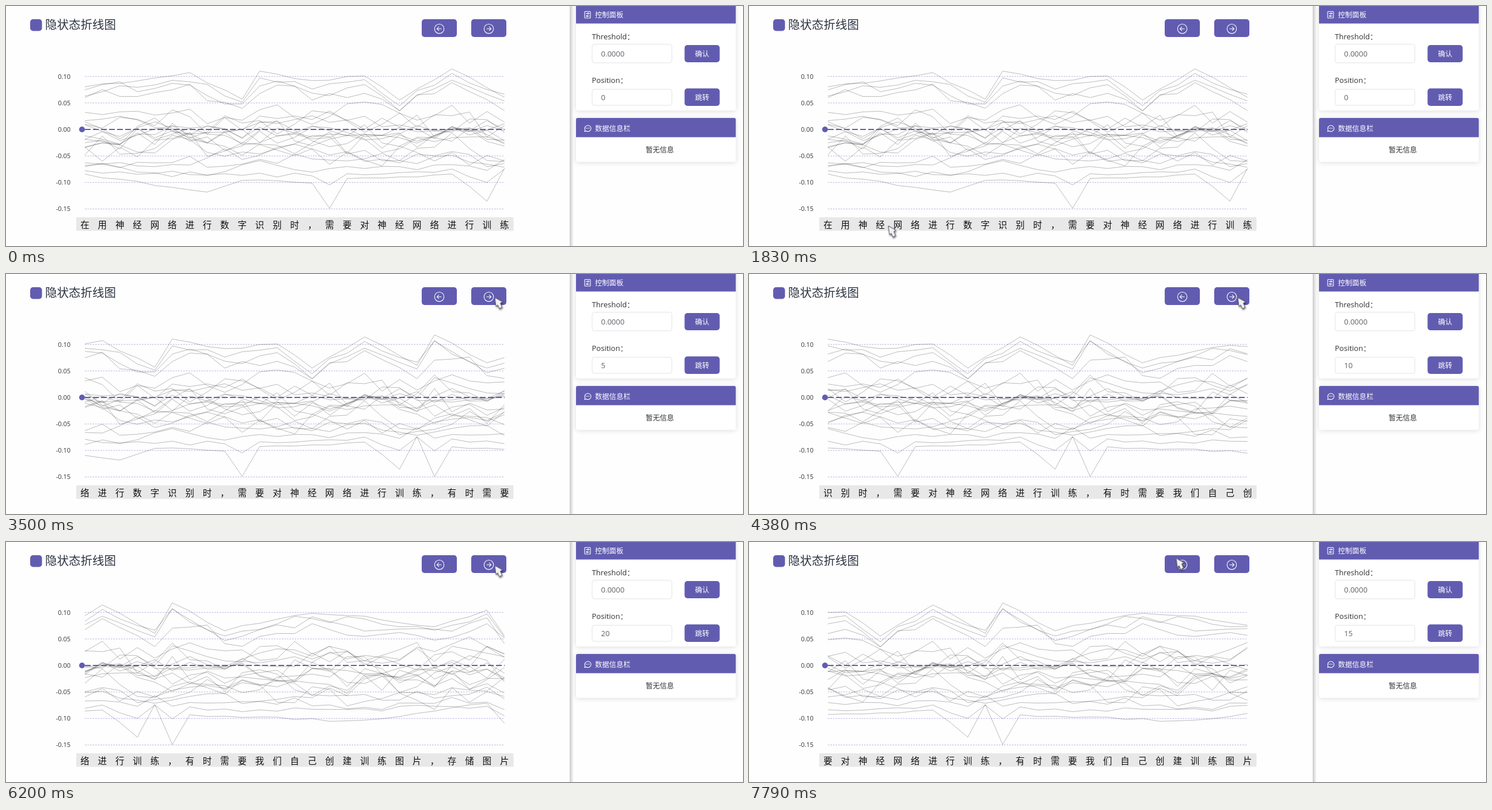
An HTML page that plays this animation: 1280 by 418 pixels, repeating every 8000 ms.

```html
<!DOCTYPE html>
<html lang="zh-CN">
<head>
<meta charset="utf-8">
<style>
  html, body { margin: 0; height: 100%; overflow: hidden; background: #fefefe; }
  svg { display: block; width: 100%; height: 100%; }
  text { font-family: "Open Sans", "Noto Sans CJK SC", sans-serif; fill: #303133; }
  .title { font: 20.5px "Noto Serif", "Noto Sans CJK SC", serif; fill: #2c3340; }
  .axis text { font-size: 11px; text-anchor: end; }
  .row text { font: 15.5px "Noto Sans CJK SC", sans-serif; fill: #111; text-anchor: middle; }
  .label { font-size: 13px; }
  .value { font-size: 13px; fill: #606266; }
  .head, .btn { font-size: 12.3px; fill: #fff; }
  .btn { font-weight: 500; text-anchor: middle; }
  .accent { fill: #625cb1; }
  .icon { fill: none; stroke: #fff; stroke-width: 1.1; }
  .field { fill: #fff; stroke: #e2e3e8; }
  .card { fill: #fff; filter: drop-shadow(0 1px 4px #0002); }
  #lines path { fill: none; stroke: #000; stroke-opacity: .27; }
  #cursor { filter: drop-shadow(1px 2px 1.5px #0008); }
</style>
</head>
<body>
<svg viewBox="0 0 1280 418" preserveAspectRatio="none">
  <defs>
    <linearGradient id="edge">
      <stop stop-color="#c9c9cc"/><stop offset="1" stop-color="#fefefe"/>
    </linearGradient>
  </defs>
  <rect x="979" width="7" height="418" fill="url(#edge)"/>

  <rect class="accent" x="42" y="23" width="20.5" height="20.5" rx="5"/>
  <text class="title" x="68" y="40">隐状态折线图</text>
  <g class="accent">
    <rect x="722" y="23" width="61" height="31" rx="5"/>
    <rect x="808" y="23" width="61" height="31" rx="5"/>
  </g>
  <g class="icon">
    <circle cx="752.5" cy="39.7" r="8.2"/>
    <path d="M756.5 39.7h-8m3.5-3.5l-3.5 3.5l3.5 3.5"/>
    <circle cx="838.5" cy="39.7" r="8.2"/>
    <path d="M834.5 39.7h8m-3.5-3.5l3.5 3.5l-3.5 3.5"/>
  </g>

  <g class="axis" id="axis"></g>
  <g id="lines"></g>
  <path d="M137 215H866" stroke="#625cb1" stroke-width="2" stroke-dasharray="10 4"/>
  <circle class="accent" cx="132" cy="215" r="5"/>
  <rect x="122" y="368" width="759.5" height="23.5" fill="#e8e8e8"/>
  <g class="row" id="row"></g>

  <rect class="card" x="990" y="-4" width="277.5" height="186" rx="4"/>
  <path class="accent" d="M990 0h277.5v30.5H990z"/>
  <g class="icon">
    <rect x="1005" y="9.5" width="10" height="11.5" rx="1"/>
    <path d="M1007 13h3m2 0h1.5M1007 17.5h1.5m2 0h3"/>
    <circle cx="1011" cy="13" r="1.2"/><circle cx="1009.5" cy="17.5" r="1.2"/>
  </g>
  <text class="head" x="1023" y="20">控制面板</text>
  <text class="label" x="1017.5" y="57.5">Threshold：</text>
  <rect class="field" x="1018" y="66.5" width="138.5" height="32.5" rx="4"/>
  <text class="value" x="1033.5" y="87.5">0.0000</text>
  <rect class="accent" x="1178.5" y="68" width="61" height="30" rx="5"/>
  <text class="btn" x="1209" y="87.7">确认</text>
  <text class="label" x="1017.5" y="134">Position：</text>
  <rect class="field" x="1018" y="145" width="138.5" height="28" rx="4"/>
  <text class="value" id="pos" x="1033.5" y="163.5"></text>
  <rect class="accent" x="1178.5" y="143.5" width="61" height="30.5" rx="5"/>
  <text class="btn" x="1209" y="163.7">跳转</text>

  <rect class="card" x="990" y="195" width="277.5" height="76.5" rx="4"/>
  <path class="accent" d="M990 228.5V198q0-3 3-3h271.5q3 0 3 3v30.5z"/>
  <g class="icon">
    <path d="M1005 218.5l.6-3a5.5 5.3 0 1 1 2 2.2z"/>
    <path d="M1007.2 212.8h1.3m1.1 0h1.3m1.1 0h1.3" stroke-width="1.4"/>
  </g>
  <text class="head" x="1023" y="217.7">数据信息栏</text>
  <text x="1135.5" y="254.7" font-size="12.3" text-anchor="middle">暂无信息</text>

  <path id="cursor" d="M0 0L13 7.5L9.5 10L12.5 16.5L8 19.5L5 13L2 15Z"
    fill="#f0eff4" stroke="#77757e" stroke-width="1.2" stroke-linejoin="round"/>
</svg>
<script>
const $ = id => document.getElementById(id);
const words = [..."在用神经网络进行数字识别时，需要对神经网络进行训练，有时需要我们自己创建训练图片，存储图片"];
const shown = 25;
const colX = i => 137 + i * 30.36;

// Linear interpolation through [at, ...values] keys
function along(keys, at) {
  const i = Math.max(1, keys.findIndex(k => k[0] >= at));
  const [a, ...from] = keys[i - 1], [b, ...to] = keys[i];
  return from.map((v, n) => v + (to[n] - v) * (at - a) / (b - a));
}

let seed = 11;
function rnd() {
  seed = (seed * 16807) % 2147483647;
  return seed / 2147483647;
}

// Shared bends of the upper and lower bands: [word, offset]
const crest = [[0, 5], [6, -20], [9, 25], [10, -25], [13, -5], [16, -17], [18, 25],
  [21, -30], [24, 17], [25, -32], [28, 15], [33, -18], [40, 12], [43, -20], [44, 22]];
const trough = [[0, -7], [7, 24], [9, 2], [13, 8], [14, 51], [15, 4], [21, -8],
  [23, 40], [24, -16], [25, 53], [26, 2], [36, 12], [43, -20], [44, 17]];

// A curve follows its band's bends around a level, with a short-memory wobble
function curve(level, bends, follow, wobble) {
  let n = 0;
  return words.map((_, i) => {
    n = n * 0.3 + (rnd() + rnd() - 1) * wobble;
    return level + follow * along(bends, i)[0] + n;
  });
}

const curves = [];
for (let k = 0; k < 4; k++) {
  curves.push(curve(138 + k * 7, crest, 1 - k * 0.1, 4 + k * 5));
  curves.push(curve(300 - k * 10, trough, 1 / (1 + k * 2), 4 + k * 5));
}
const inner = 14;
for (let k = 0; k < inner; k++) {
  const s = 2 * k / (inner - 1) - 1;
  curves.push(curve(227 + 36 * s * Math.sqrt(Math.abs(s)), crest, 0.15, 30));
}

$("axis").innerHTML = [0.1, 0.05, 0, -0.05, -0.1, -0.15].map(v => {
  const y = 215 - v * 923;
  const line = v ? `<path d="M137 ${y}H866" stroke="#b3b0e0" stroke-dasharray="2.5 2"/>` : "";
  return `<text x="112" y="${y + 4}">${v.toFixed(2)}</text>${line}`;
}).join("");

let current = -1;
function drawChart(start) {
  if (start === current) return;
  current = start;
  const view = list => list.slice(start, start + shown);
  $("lines").innerHTML = curves.map(c =>
    `<path d="M${view(c).map((y, i) => colX(i) + " " + y.toFixed(1)).join("L")}"/>`
  ).join("");
  $("row").innerHTML = view(words).map((w, i) =>
    `<text x="${colX(i)}" y="386.5">${w}</text>`
  ).join("");
}

// The field may change a little before the chart does
const jumps = [
  { field: 0, chart: 0, start: 0 },
  { field: 3170, chart: 3500, start: 5 },
  { field: 4310, chart: 4380, start: 10 },
  { field: 5300, chart: 5300, start: 15 },
  { field: 6200, chart: 6200, start: 20 },
  { field: 7460, chart: 7460, start: 15 }
];
const startOf = (part, t) => jumps.filter(j => j[part] <= t).pop().start;

// Pointer tip: [time, x, y]
const route = [[470, 629, 402], [800, 420, 364], [1270, 133, 382], [1500, 100, 397], [1830, 242, 383],
  [2110, 806, 141], [2390, 858, 62], [2530, 849, 41], [6390, 849, 41], [6590, 739, 27],
  [6790, 742, 28.5], [8000, 742, 28.5]];

function frame(now) {
  const t = now % 8000;
  drawChart(startOf("chart", t));
  $("pos").textContent = startOf("field", t);
  const tick = Math.max(470, 1830 + Math.floor((t - 1830) / 70) * 70);
  $("cursor").setAttribute("visibility", t < 470 ? "hidden" : "visible");
  $("cursor").setAttribute("transform", `translate(${along(route, tick)})`);
  requestAnimationFrame(frame);
}
requestAnimationFrame(frame);
</script>
</body>
</html>
```
